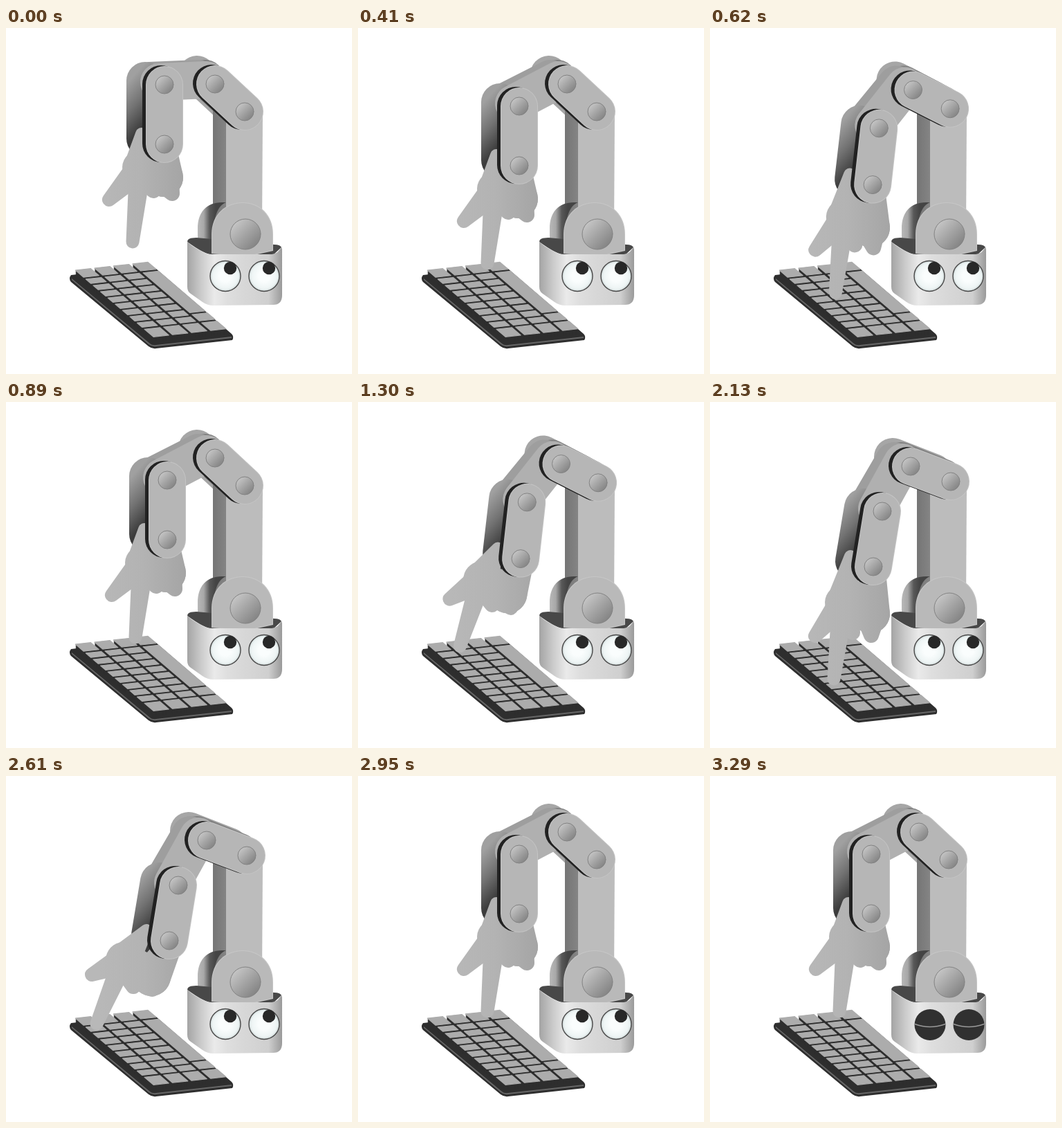
Recreate the animation shown at these times as an HTML page with a canvas. Size 500 px wide and 500 px high, loop 3.36 s.

```html
<!DOCTYPE html>
<html lang="en">
<head>
<meta charset="utf-8">
<title>Typing robot arm</title>
<style>
  html, body { margin: 0; width: 100%; height: 100%; overflow: hidden; background: #fff; }
  canvas { display: block; width: 500px; height: 500px; }
</style>
</head>
<body>
<canvas id="stage" width="500" height="500"></canvas>
<script>
const g = document.getElementById('stage').getContext('2d');

const lerp = (a, b, k) => a + (b - a) * k;
const mixPoint = (a, b, k) => a.map((v, i) => lerp(v, b[i], k));
const mix = (a, b, k) => Object.fromEntries(Object.keys(a).map(n => [n, mixPoint(a[n], b[n], k)]));
const shift = (p, x, y) => [p[0] + x, p[1] + y];

// p1, p2: upper plate joints; q1, q2: lower plate joints
const up = { p1: [345, 121], p2: [302, 81], q1: [229, 82], q2: [229, 168] };
const down = { ...up, q1: [233, 113], q2: [233, 199] };
const reach = { p1: [348, 115], p2: [290, 93], q1: [249, 158], q2: [236, 238] };

// Hand points, measured from joint q2
const point = { palm: [-35, 34], heel: [-1, 48], thumb: [-80, 80], index: [-46, 141], knuckle: [-16, 67], last: [4, 60] };
const spread = { palm: [-43, 24], heel: [4, 24], thumb: [-99, 13], index: [-90, 113], knuckle: [-50, 70], last: [-10, 129] };
const poke = { palm: [-44, 52], heel: [-4, 68], thumb: [-84, 100], index: [-57, 162], knuckle: [-30, 95], last: [0, 80] };
const slant = { palm: [-66, 28], heel: [-26, 52], thumb: [-112, 49], index: [-105, 120], knuckle: [-52, 66], last: [-20, 60] };
const gestures = [spread, poke, slant];

function ramp(x0, y0, x1, y1, ...cols) {
  const f = g.createLinearGradient(x0, y0, x1, y1);
  cols.forEach((c, i) => f.addColorStop(i / (cols.length - 1), c));
  return f;
}

function poly(fill, ...pts) {
  g.beginPath();
  pts.forEach(p => g.lineTo(...p));
  g.closePath();
  g.fillStyle = fill;
  g.fill();
}

function shape(d, fill) {
  g.fillStyle = fill;
  g.fill(new Path2D(d));
}

function cap(a, b, r, paint) {
  g.beginPath();
  g.moveTo(...a);
  g.lineTo(...b);
  g.lineCap = 'round';
  g.lineWidth = 2 * r;
  g.strokeStyle = paint;
  g.stroke();
}

// Two circles joined by their outer tangents
function limb(a, ra, b, rb) {
  const dx = b[0] - a[0], dy = b[1] - a[1];
  const turn = Math.atan2(dy, dx);
  const off = Math.acos(Math.max(-1, Math.min(1, (ra - rb) / Math.hypot(dx, dy))));
  g.beginPath();
  g.arc(...a, ra, turn + off, turn - off + 2 * Math.PI);
  g.arc(...b, rb, turn - off, turn + off);
  g.fill();
}

function disc(x, y, r, fill, line, w = 1) {
  g.beginPath();
  g.arc(x, y, r, 0, 7);
  g.fillStyle = fill;
  g.fill();
  if (line) {
    g.strokeStyle = line;
    g.lineWidth = w;
    g.stroke();
  }
}

function bolt([x, y], r) {
  const s = r * 0.7;
  disc(x, y, r, ramp(x - s, y - s, x + s, y + s, '#c4c4c4', '#a4a4a4', '#858585'), '#828282');
}

function plate(a, b) {
  cap(shift(a, -5, -1), shift(b, -5, -1), 27, '#222');
  cap(a, b, 27, '#c4c4c4');
  cap(a, b, 26, '#b6b6b6');
  bolt(a, 13);
  bolt(b, 13);
}

function keyboard() {
  const at = (u, v, dy) => [96 + 108 * u + 116 * v, 354 - 12 * u + 99 * v + dy];
  shape('M94 357L206 345Q212 344 217 348L326 442Q330 446 327 451L217 463Q211 464 206 460L94 367Q90 362 94 357Z', '#2e2e2e');
  shape('M95 362L208 456Q211 459 217 458L326 446V448L217 460Q211 461 206 457L95 364Z', '#666');
  const key = (u0, u1, v0, v1) => {
    const [a, b, c, d] = [u0 + 0.025, u1 - 0.025, v0 + 0.014, v1 - 0.014];
    const quad = dy => [at(a, c, dy), at(b, c, dy), at(b, d, dy), at(a, d, dy)];
    for (let dy = 2; dy >= -4; dy--) poly('#2e2e2e', ...quad(dy));
    poly('#acacac', ...quad(-5));
    g.strokeStyle = '#acacac';
    g.lineWidth = 1.2;
    g.lineJoin = 'round';
    g.stroke();
  };
  const row = (v0, v1, n) => {
    for (let c = n - 1; c >= 0; c--) key(c * 0.255, (c + 1) * 0.255, v0, v1);
  };
  const h = 0.73 / 8;
  row(0, 0.13, 4);
  key(0.765, 1.02, 0.13, 0.74);
  key(0.765, 1.02, 0.74, 0.86);
  for (let r = 0; r < 8; r++) row(0.13 + r * h, 0.13 + (r + 1) * h, 3);
  row(0.86, 1, 4);
}

function column() {
  poly(ramp(299, 0, 319, 0, '#757575', '#858585'), [299, 108], [319, 112], [319, 300], [299, 300]);
  poly('#bcbcbc', [318, 110], [371, 120], [370, 290], [318, 290]);
}

function base(blink) {
  shape('M277 312V290C277 266 290 252 312 252H318C303 258 298 280 298 325Z',
    ramp(277, 0, 303, 0, '#b8b8b8', '#a8a8a8', '#585858', '#444'));
  shape('M262 309Q262 303 275 303L388 313Q396 313 398 317L386 328H300Q288 328 262 309Z', '#484848');
  shape('M297 326V298C297 269 318 252 342 252C367 252 386 270 386 298V322L350 330Z', '#c6c6c6');
  shape('M298 326V298C298 270 319 253 342 253C366 253 385 271 385 298V321L350 329Z', '#b9b9b9');
  bolt([346, 298], 22);
  shape('M262 308Q264 313 285 324Q290 327 298 327H384Q394 326 398 316L399 320V386Q399 400 386 400L300 401Q291 401 284 396L267 384Q262 381 262 374Z',
    ramp(262, 0, 399, 0, '#a4a4a4', '#cacaca', '#eaeaea', '#dedede', '#d8d8d8', '#d4d4d4', '#cfcfcf', '#9a9a9a'));
  for (const x of [317, 373]) eye(x, 358.5, blink);
}

function eye(x, y, blink) {
  if (blink) {
    disc(x + 1, y + 1, 22.5, '#303030');
    g.strokeStyle = '#999';
    g.lineWidth = 1.6;
    g.stroke(new Path2D(`M${x - 21} ${y}q22 8 44 0`));
    return;
  }
  const f = g.createRadialGradient(x, y, 8, x, y, 23);
  f.addColorStop(0, '#fafdfd');
  f.addColorStop(0.7, '#edf4f4');
  f.addColorStop(1, '#c4cece');
  disc(x, y, 22, f, '#484848', 1.4);
  disc(x + 7, y - 11.5, 9.2, '#282828');
}

function hand(h, q) {
  g.save();
  g.translate(...q);
  g.fillStyle = ramp(-100, 0, 30, 0, '#b8b8b8', '#b3b3b3', '#a4a4a4');
  limb([-33, -15], 9, h.palm, 24);
  limb([0, 8], 18, h.heel, 28);
  limb(h.palm, 26, h.heel, 28);
  limb(h.palm, 20, h.thumb, 10);
  limb(h.palm, 16, h.index, 9.5);
  limb(h.heel, 22, h.last, 10);
  limb(h.palm, 22, h.knuckle, 11);
  limb(h.heel, 22, shift(h.knuckle, 27, 4), 11);
  g.restore();
}

function arm({ p1, p2, q1, q2 }, h) {
  cap(shift(p1, -25, -13), shift(p2, -26, -14), 27, '#a6a6a6');
  cap(shift(p1, -10, -5), shift(p2, -14, -8), 27, '#808080');
  column();
  cap(shift(p2, -24, -8), shift(q1, -22, -6), 27, '#9e9e9e');
  // rear lower plate, shaded across its width and towards its foot
  const a = shift(q1, -28, -6), b = shift(q2, -28, -8);
  const m = mixPoint(a, b, 0.5);
  cap(a, b, 27, ramp(m[0] - 34, m[1] - 30, m[0] + 10, m[1] + 10, '#a0a0a0', '#737373', '#3c3c3c'));
  cap(shift(p2, -12, -6), shift(q1, -8, -4), 27, '#b0b0b0');
  hand(h, q2);
  plate(q1, q2);
  plate(p1, p2);
}

// Each beat swings the arm down in three steps and back in three
const beat = 480, steps = 6, beats = 7;
const cuts = [70, 140, 210, 340, 410];

function stepAt(ms) {
  const t = ms % (beat * beats);
  return steps * Math.floor(t / beat) + cuts.filter(c => t % beat >= c).length;
}

function draw(i) {
  const s = i % steps;
  const depth = Math.min(s, steps - s);
  const far = Math.sin(Math.max(0, depth - 1) * Math.PI / 4);
  const gesture = gestures[Math.floor(i / steps) % gestures.length];
  g.fillStyle = '#fff';
  g.fillRect(0, 0, 500, 500);
  keyboard();
  arm(depth ? mix(down, reach, far) : up, mix(point, gesture, far));
  base(i >= steps * beats - 2);
}

const start = performance.now();
let last = -1;
function tick() {
  const i = stepAt(performance.now() - start);
  if (i !== last) draw(last = i);
  requestAnimationFrame(tick);
}
tick();
</script>
</body>
</html>
```
